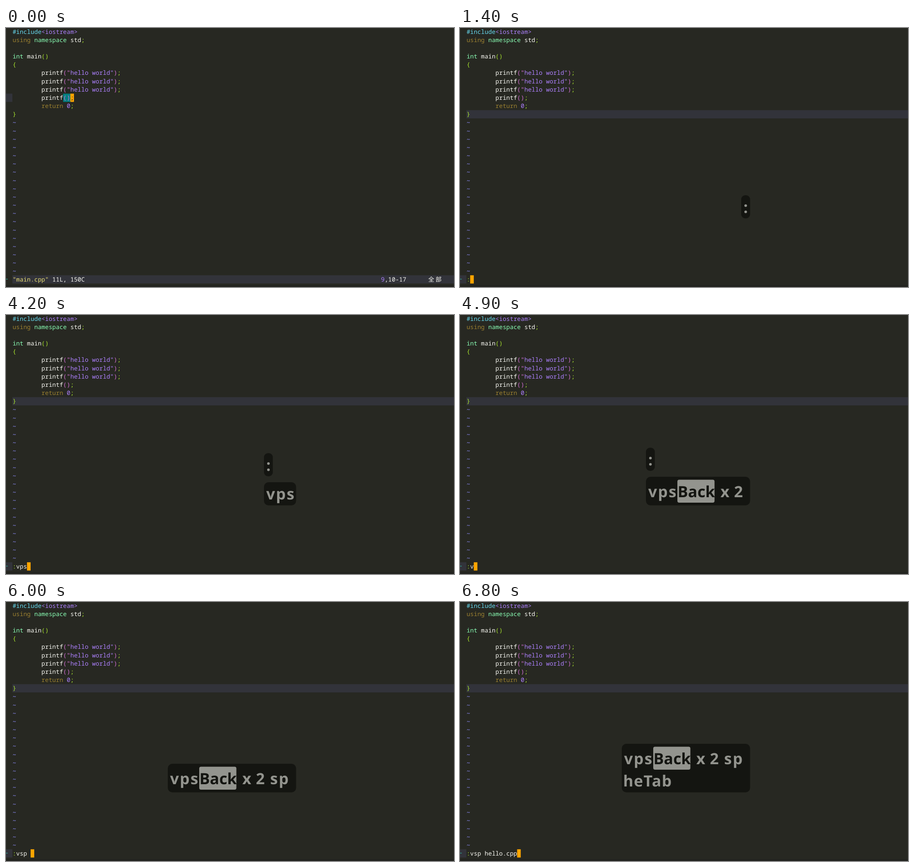
Animation of 983x570 px, one loop 8000 ms. Source, as an HTML page with a canvas:

```html
<!DOCTYPE html>
<html lang="en">
<head>
<meta charset="utf-8">
<title>Editor session</title>
<style>
html, body { margin: 0; width: 100%; height: 100%; overflow: hidden; background: #272822; }
canvas { display: block; }
</style>
</head>
<body>
<canvas id="stage" width="983" height="570"></canvas>
<script>
const ctx = document.getElementById('stage').getContext('2d');
const LOOP = 8000, CELL = 7.925, ROW = 18.17, LEFT = 14.4, RIGHT = 636.5;
const WHITE = '#f8f8f2', LIME = '#a6e22e', PURPLE = '#ae81ff', PINK = '#d670d6',
  OLIVE = '#9b8030', MINT = '#8affb5', CYAN = '#66d9ef', YELLOW = '#e6db74',
  TILDE = '#8f8fff', BG = '#272822', LINE = '#32333a', TEAL = '#008080',
  ORANGE = '#ffa500', PILL = '#141511', KEY = '#93948e';
const MONO = '500 13.2px "Noto Sans Mono", "Noto Sans CJK SC", monospace';
const BOLD = 'bold 34px "Open Sans", "Noto Sans", sans-serif';

const hello = [[WHITE, 'printf'], [PINK, '("'], [PURPLE, 'hello world"'], [PINK, ')'], [LIME, ';']];
const code = [
  [0, 0, [[CYAN, '#include'], [PURPLE, '<iostream>']]],
  [1, 0, [[OLIVE, 'using '], [MINT, 'namespace '], [WHITE, 'std'], [LIME, ';']]],
  [3, 0, [[MINT, 'int '], [WHITE, 'main'], [LIME, '()']]],
  [4, 0, [[LIME, '{']]],
  [5, 8, hello], [6, 8, hello], [7, 8, hello],
  [8, 8, [[WHITE, 'printf'], [PINK, '()'], [LIME, ';']]],
  [9, 8, [[OLIVE, 'return '], [PURPLE, '0'], [LIME, ';']]],
  [10, 0, [[LIME, '}']]]
];

// [time, command line]
const commands = [[1400, ':'], [4000, ':v'], [4100, ':vp'], [4200, ':vps'], [4800, ':vp'],
  [4900, ':v'], [5000, ':vs'], [5200, ':vsp'], [5500, ':vsp '], [6200, ':vsp h'],
  [6300, ':vsp he'], [6800, ':vsp hello.cpp']];

// [time, pill width, typed, Back pressed, repeat, typed after, second line]
const keys = [[3900, 29, 'v'], [4000, 50.5, 'vp'], [4100, 50.5, 'vp'], [4200, 70.5, 'vps'],
  [4800, 156, 'vps', true], [4900, 228.5, 'vps', true, 'x 2'],
  [5000, 247, 'vps', true, 'x 2', 's'], [5200, 270, 'vps', true, 'x 2', 'sp'],
  [5500, 281.5, 'vps', true, 'x 2', 'sp'], [6200, 281.5, 'vps', true, 'x 2', 'sp', 'h'],
  [6300, 281.5, 'vps', true, 'x 2', 'sp', 'he'], [6700, 281.5, 'vps', true, 'x 2', 'sp', 'heTab']];

const latest = (list, t) => list.filter(e => e[0] <= t).pop();
const rowTop = row => row * ROW - 0.9;

function rect(x, y, w, h, color) {
  ctx.fillStyle = color;
  ctx.fillRect(x, y, w, h);
}

function band(row, x, width) {
  rect(x, rowTop(row), width, ROW, LINE);
}

function cell(row, col, color, count = 1) {
  rect(LEFT + col * CELL, rowTop(row), count * CELL, ROW, color);
}

function write(row, col, parts) {
  ctx.font = MONO;
  for (const [color, text] of parts) {
    ctx.fillStyle = color;
    for (const ch of text) {
      ctx.fillText(ch, LEFT + col * CELL, rowTop(row) + 13.5);
      col += ch > '\u2fff' ? 2 : 1;
    }
  }
}

function cursor(row, col, ch = '') {
  cell(row, col, ORANGE);
  write(row, col, [[BG, ch]]);
}

function box(x, y, w, h, r, color) {
  ctx.fillStyle = color;
  ctx.beginPath();
  ctx.roundRect(x, y, w, h, r);
  ctx.fill();
}

function label(text, x, y, color = KEY, spacing = 0) {
  ctx.font = BOLD;
  ctx.letterSpacing = spacing + 'px';
  ctx.fillStyle = color;
  ctx.fillText(text, x, y);
  ctx.letterSpacing = '0px';
}

function colonPill(x, y, alpha) {
  ctx.globalAlpha = alpha;
  box(x, y, 19.5, 51, 9, PILL);
  label(':', x + 5, y + 39);
  ctx.globalAlpha = 1;
}

function overlay(t) {
  if (t < 1300) return;
  const state = latest(keys, t);
  if (!state) return colonPill(617, 368, 1);
  const [, width, typed, back, repeat, after, second] = state;
  const x = RIGHT - width;
  const top = second ? 312 : back ? 356 : 368;
  const base = top + (back ? 45 : 38);
  if (t < 6000) colonPill(x, top - 64, t < 5900 ? 1 : 0.5);
  box(x, top, width, 419 - top, 10, PILL);
  label(typed, x + 5, base, KEY, 2);
  if (back) {
    box(x + 69, top + 6.5, 81.5, 50.5, 4, KEY);
    label('Back', x + 69.5, base, PILL);
  }
  if (repeat) label(repeat, x + 163.5, base, KEY, 0.6);
  if (after) label(after, x + 224.5, base, KEY, 2);
  if (second) label(second, x + 3, 406, KEY, 1.2);
}

function terminal(t) {
  const moved = t >= 400, command = latest(commands, t);
  rect(0, 0, 983, 570, BG);
  rect(0, 566, 983, 4, '#22231f');
  band(command ? 30 : 8, 0, 14);
  band(moved ? 10 : 30, 14, 969);
  rect(0, 552, 4, 1.2, '#2e9c8c');
  if (t < 700) cell(8, 14, TEAL, 2);
  else if (!command) cell(4, 0, TEAL);

  for (const line of code) write(...line);
  for (let row = 11; row < 30; row++) write(row + 0.05, 0, [[TILDE, '~']]);

  if (command) {
    const text = command[1];
    write(30, 0, [[LIME, ':'], [WHITE, text.slice(1)]]);
    cursor(30, text.length);
  } else {
    write(30, 0, [[YELLOW, '"main.cpp"'], [WHITE, ' 11L, 150C']]);
    write(30, 102, moved ? [[PURPLE, '11'], [WHITE, ',1']] : [[PURPLE, '9'], [WHITE, ',10-17']]);
    write(30, 115.1, [[WHITE, '全部']]);
    if (moved) cursor(10, 0, '}');
    else cursor(8, 16, ';');
  }
}

function frame(now) {
  const t = now % LOOP;
  terminal(t);
  overlay(t);
  requestAnimationFrame(frame);
}
ctx.textRendering = 'geometricPrecision';
requestAnimationFrame(frame);
</script>
</body>
</html>
```
